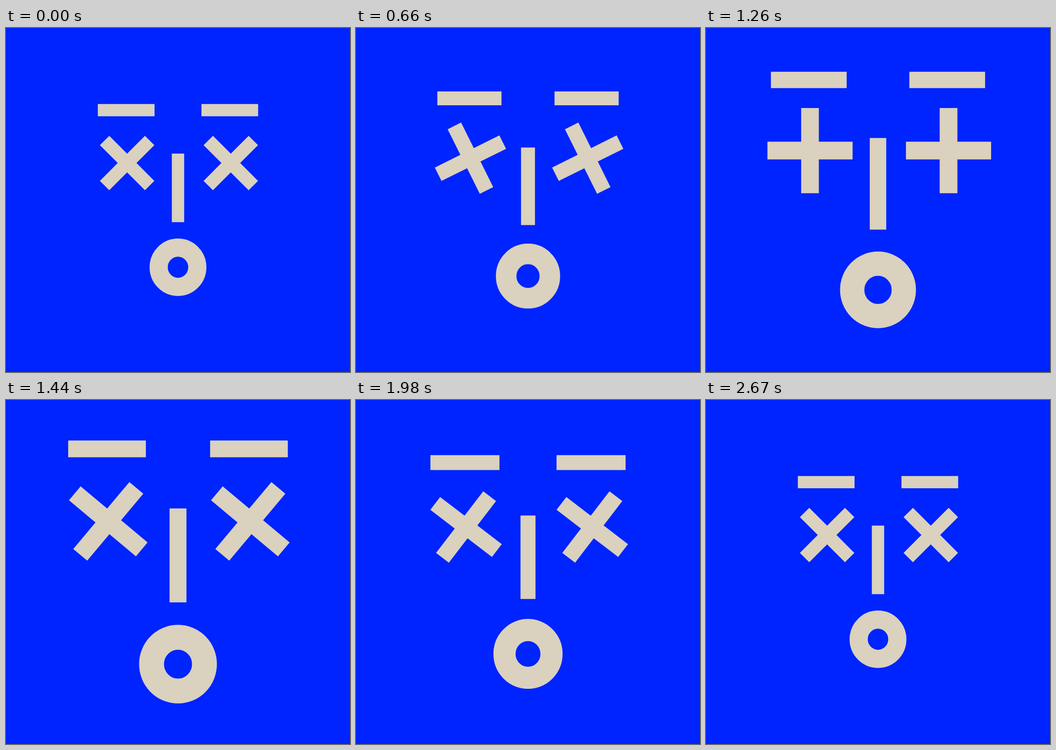
Recreate the animation shown at these times as an HTML page. Size 748x748 px, loop 2700 ms.

```html
<!DOCTYPE html>
<html lang="en">
<head>
<meta charset="utf-8">
<title>Face</title>
<style>
  html, body { margin: 0; width: 100%; height: 100%; overflow: hidden; background: #0024ff; }
  svg { display: block; width: 100%; height: 100%; }
</style>
</head>
<body>
<svg viewBox="0 0 748 748" fill="#dad1be">
  <defs>
    <path id="cross" d="M-69.3-14.4H-14.4V-69.3H14.4V-14.4H69.3V14.4H14.4V69.3H-14.4V14.4H-69.3Z"/>
  </defs>
  <g id="face">
    <rect x="-174.3" y="-208.7" width="123.3" height="26.6"/>
    <rect x="51" y="-208.7" width="123.3" height="26.6"/>
    <g transform="translate(-110.65 -80.4)"><use class="eye" href="#cross"/></g>
    <g transform="translate(114.8 -80.4)"><use class="eye" href="#cross"/></g>
    <rect x="-13.4" y="-100.9" width="26.8" height="149.1"/>
    <ellipse cy="146.25" rx="42" ry="42.65" fill="none" stroke="#dad1be" stroke-width="39.5"/>
  </g>
</svg>
<script>
const LOOP = 2700, TICK = 30;
const face = document.getElementById('face');
const eyes = document.querySelectorAll('.eye');

const clamp = v => Math.min(1, Math.max(0, v));
const progress = (v, from, to) => clamp((v - from) / (to - from));

// Cubic ease with flat ends; x1 and x2 are the handle positions.
function ease(x, x1 = 1 / 3, x2 = 2 / 3) {
  let lo = 0, hi = 1;
  for (let i = 0; i < 30; i++) {
    const w = (lo + hi) / 2, v = 1 - w;
    if (3 * v * v * w * x1 + 3 * v * w * w * x2 + w * w * w < x) lo = w;
    else hi = w;
  }
  return lo * lo * (3 - 2 * lo);
}

// Five poses per six ticks: the first of each group is held twice.
function poseAt(ms) {
  const tick = Math.floor((ms % LOOP) / TICK + 1e-4);
  return 5 * Math.floor(tick / 6) + Math.max(0, tick % 6 - 1);
}

function draw(ms) {
  const k = poseAt(ms);
  const grow = k < 40 ? ease(progress(k, 0, 40), 1 / 3, 5 / 6) : 1 - ease(progress(k, 40, 74));
  const angle = 45 + 270 * ease(progress(k, 10, 60));
  face.setAttribute('transform', `translate(374 374) scale(${1 + 0.37 * grow})`);
  eyes.forEach(eye => eye.setAttribute('transform', `rotate(${angle})`));
}

const start = performance.now();
function loop(now) {
  draw(Math.max(0, now - start));
  requestAnimationFrame(loop);
}
draw(0);
requestAnimationFrame(loop);
</script>
</body>
</html>
```
